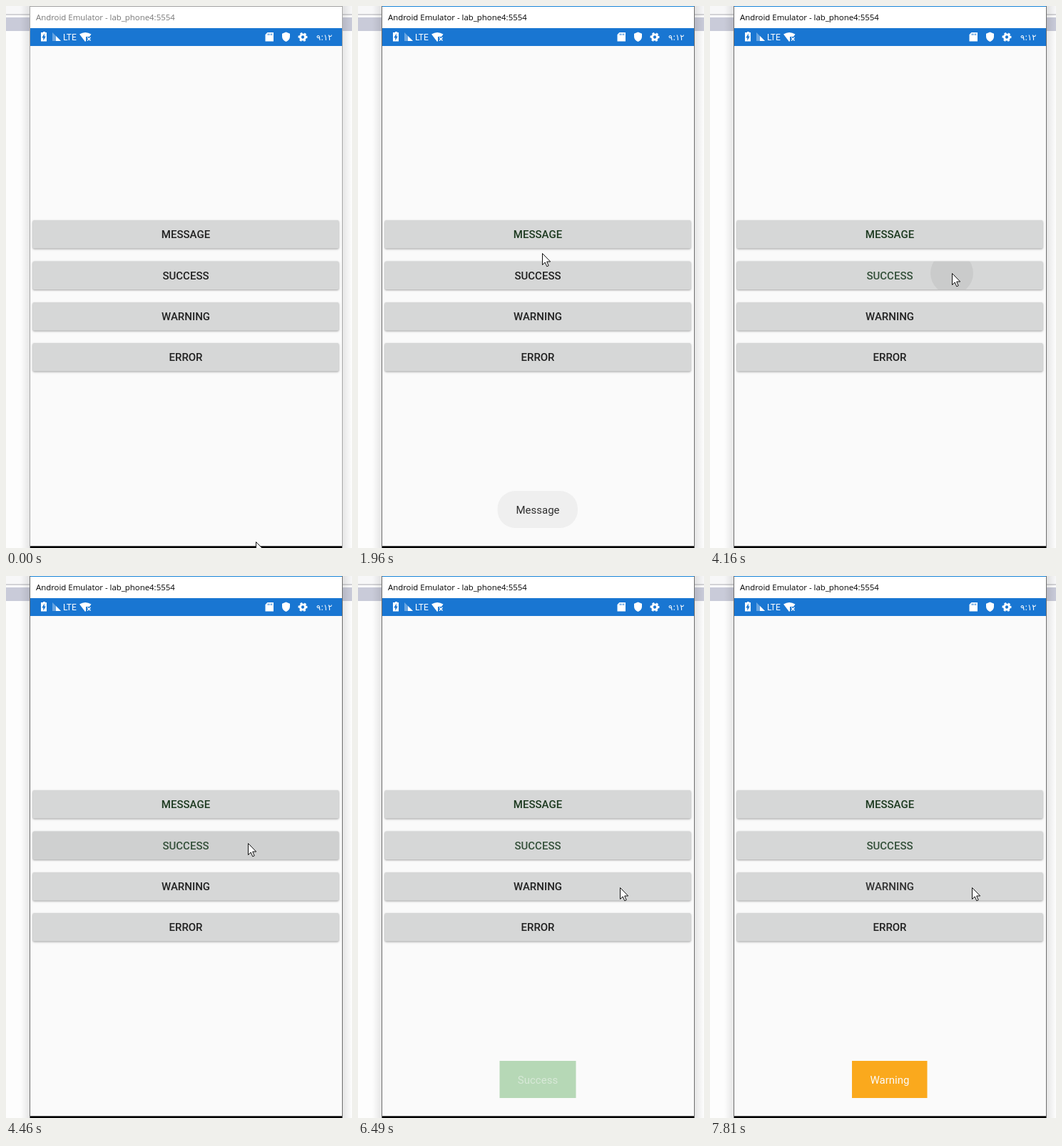
Animation of 485x759 px, one loop 8000 ms. Source, as an HTML page with a canvas:

```html
<!DOCTYPE html>
<html lang="en">
<head>
<meta charset="utf-8">
<title>Toast demo</title>
<style>
html, body { margin: 0; width: 100%; height: 100%; overflow: hidden; background: #fdfdfd; }
canvas { display: block; }
</style>
</head>
<body>
<canvas id="stage" width="485" height="759"></canvas>
<script>
const g = document.getElementById('stage').getContext('2d');
const LOOP = 8000;
const ACTIVE_AT = 800;

// Screen refreshes: first time, last time, number of steps
const bursts = [
  [70, 800, 11], [1030, 1820, 11], [1890, 2280, 6], [2450, 2830, 6],
  [2990, 3760, 11], [3990, 3990, 1], [4160, 4860, 10], [5010, 5010, 1],
  [5720, 5950, 4], [6340, 6660, 5], [6810, 6810, 1], [6970, 7730, 11], [7810, 7810, 1]
];

// Pointer path: time, x, y
const path = [
  [0, 350, 750], [727, 256, 322], [1820, 256, 322], [1968, 258, 346],
  [2280, 296, 745], [2373, 296, 745], [2606, 296, 762], [2830, 200, 790],
  [2990, 173, 700], [3298, 409, 557], [3600, 345, 358], [3760, 339, 374],
  [5643, 339, 374], [5950, 365, 436], [6260, 365, 436], [6340, 367, 436], [LOOP, 367, 436]
];

const buttons = [
  { label: 'MESSAGE', y: 300, down: 800, tap: 1030, x: 256, ty: 322, after: '#1d3a20' },
  { label: 'SUCCESS', y: 357.5, down: 3990, tap: 4160, x: 339, ty: 374, after: '#34503a' },
  { label: 'WARNING', y: 415, down: 6810, tap: 6970, x: 367, ty: 436, after: '#303030' },
  { label: 'ERROR', y: 472, down: Infinity, tap: Infinity }
];

const toasts = [
  { text: 'Message', x: 195.5, w: 112.5, r: 25, fill: '#efefef', ink: '#303030', start: 1420, end: 3270 },
  { text: 'Success', x: 198.5, w: 107, r: 0, fill: '#74b775', ink: '#fafafa', start: 4550, end: 6340 },
  { text: 'Warning', x: 199, w: 105.5, r: 0, fill: '#faa91d', ink: '#fafafa', start: 7360, end: 9600 }
];

const clamp = v => Math.max(0, Math.min(1, v));

function snap(t) {
  let s = 0;
  for (const [a, b, n] of bursts) {
    if (t < a) break;
    const d = (b - a) / (n - 1) || 1;
    s = a + Math.min(n - 1, Math.floor((t - a + 15) / d)) * d;
  }
  return s;
}

function pointerAt(t) {
  const i = Math.max(1, path.findIndex(k => k[0] >= t));
  const [t0, x0, y0] = path[i - 1], [t1, x1, y1] = path[i];
  const p = clamp((t - t0) / (t1 - t0));
  return [Math.round(x0 + (x1 - x0) * p), Math.round(y0 + (y1 - y0) * p)];
}

function rect(x, y, w, h, color) {
  g.fillStyle = color;
  g.fillRect(x, y, w, h);
}

function round(x, y, w, h, r, color) {
  g.fillStyle = color;
  g.beginPath();
  g.roundRect(x, y, w, h, r);
  g.fill();
}

function disc(x, y, r, color) {
  g.fillStyle = color;
  g.beginPath();
  g.arc(x, y, r, 0, 7);
  g.fill();
}

function shape(d, color) {
  g.fillStyle = color;
  g.fill(new Path2D(d));
}

function text(str, x, y, font, color, align = 'left') {
  g.font = font;
  g.fillStyle = color;
  g.textAlign = align;
  g.fillText(str, x, y);
}

function shade(from, to, x, w) {
  const fade = g.createLinearGradient(from, 0, to, 0);
  fade.addColorStop(0, 'rgba(0,0,0,0)');
  fade.addColorStop(1, 'rgba(0,0,0,.09)');
  rect(x, 0, w, 759, fade);
}

function drawDesktop() {
  rect(0, 0, 485, 759, '#fdfdfd');
  rect(0, 0, 485, 11, '#f7f7f8');
  rect(0, 11, 485, 2, '#d3d3d6');
  rect(0, 16, 485, 19, '#c9cbd9');
  shade(20, 33, 20, 13);
  shade(485, 472, 472, 13);
}

function drawGear(x, y) {
  g.strokeStyle = '#fff';
  for (const [r, width, dash] of [[3.6, 3, []], [5.5, 2, [2.9, 2.86]]]) {
    g.lineWidth = width;
    g.setLineDash(dash);
    g.beginPath();
    g.arc(x, y, r, -.27, 2 * Math.PI - .27);
    g.stroke();
  }
  g.setLineDash([]);
}

function drawStatusBar() {
  const blue = '#1976d2';
  rect(34, 31, 437, 25, blue);
  shape('M51 37h1v-1h3v1h2v12.5h-8V37z', '#fff');
  shape('M53.8 38.5v4h2l-3.5 6v-4h-2z', blue);
  shape('M65 37v12h12z', 'rgba(255,255,255,.35)');
  shape('M70 42v7h7z', '#fff');
  text('LTE', 80, 48, '12px Roboto, sans-serif', '#fff');
  shape('M103 39.5q8-5 16.5 0L117 43h-5v6l-1 1z', '#fff');
  g.strokeStyle = '#fff';
  g.lineWidth = 1.4;
  g.stroke(new Path2D('M114 44l4.5 4.5M118.5 44l-4.5 4.5'));
  shape('M366.5 37H375v12.5H363.5V40z', '#fff');
  for (const x of [367, 369.5, 372]) rect(x, 38.5, 1, 2.5, blue);
  shape('M392.5 36.5l5.5 2.2v4q0 5-5.5 7.3q-5.5-2.3-5.5-7.3v-4z', '#fff');
  drawGear(416, 43.5);
  text('٩:١٢', 435, 47.5, '11.5px "DejaVu Sans", sans-serif', '#fff');
}

function drawWindow(active) {
  const edge = active ? '#6f6f6f' : '#a8a8a8';
  rect(33, 0, 439, 759, edge);
  rect(34, 0, 437, 1, active ? '#1883d7' : '#a0a0a0');
  rect(34, 1, 437, 30, '#fff');
  text('Android Emulator - lab_phone4:5554', 42, 20,
    '11.4px "Open Sans", sans-serif', active ? '#000' : '#777');
  rect(34, 56, 437, 700, '#fafafa');
  rect(34, 756, 437, 3, '#000');
  rect(34, 756, 437, .5, '#999');
  drawStatusBar();
}

function drawButton(b, t) {
  g.save();
  g.shadowColor = 'rgba(0,0,0,.35)';
  g.shadowBlur = 2.5;
  g.shadowOffsetY = 1;
  round(37.5, b.y, 429, 39.5, 2, '#d6d7d7');
  g.restore();

  const p = (t - b.tap) / 700;
  if (p >= 0 && p < 1) {
    g.save();
    g.beginPath();
    g.roundRect(37.5, b.y, 429, 39.5, 2);
    g.clip();
    disc(b.x, b.ty, 30 + 850 * p, `rgba(0,0,0,${.055 * (1 - p)})`);
    g.restore();
  }
  text(b.label, 252, b.y + 25.3, '500 15px Roboto, sans-serif', t >= b.tap ? b.after : '#212121', 'center');
}

function drawToast(o, t) {
  const alpha = clamp((t - o.start) / 400) * (1 - clamp((t - o.end) / 320));
  if (!alpha) return;
  g.globalAlpha = alpha;
  round(o.x, 679, o.w, 52, o.r, o.fill);
  text(o.text, 252, 711, '15px Roboto, sans-serif', o.ink, 'center');
  g.globalAlpha = 1;
}

function drawPointer(x, y) {
  g.save();
  g.translate(x + .5, y + .5);
  const arrow = new Path2D('M0 0V16L3.7 12.5L6.3 18.3L8.7 17.2L6.2 11.5H11.2Z');
  g.fillStyle = '#fff';
  g.fill(arrow);
  g.strokeStyle = '#111';
  g.lineWidth = 1;
  g.stroke(arrow);
  g.restore();
}

function draw(now) {
  const t = snap(now % LOOP);
  drawDesktop();
  drawWindow(t >= ACTIVE_AT);
  buttons.forEach(b => drawButton(b, t));
  toasts.forEach(o => drawToast(o, t));
  for (const b of buttons)
    if (t >= b.down && t < b.tap) disc(b.x, b.ty, 12, 'rgba(255,255,0,.47)');
  drawPointer(...pointerAt(t));
}

const begin = performance.now();
function tick() {
  draw(performance.now() - begin);
  requestAnimationFrame(tick);
}
tick();
</script>
</body>
</html>
```
